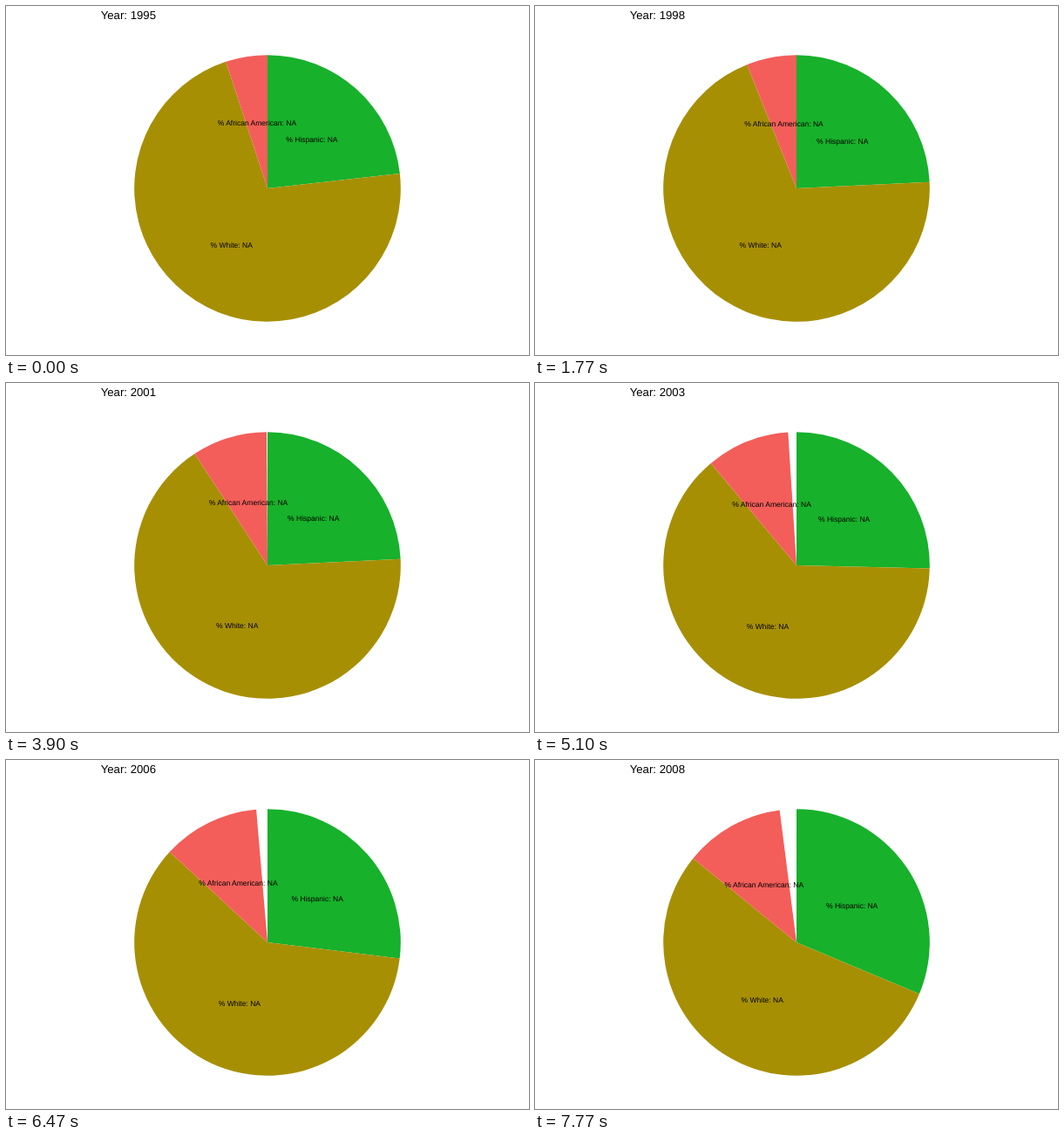
These frames come from a looping animation (600 by 400 pixels, 8000 ms). An HTML page:

```html
<!DOCTYPE html>
<html lang="en">
<head>
<meta charset="utf-8">
<title>Shares by year</title>
<style>
  html, body { margin: 0; width: 100%; height: 100%; overflow: hidden; background: #fff; }
  svg { display: block; width: 600px; height: 400px; }
  text {
    font: 8.54px "Liberation Sans", Arial, sans-serif;
    text-anchor: middle;
    text-rendering: geometricPrecision;
  }
  #year { font-size: 13.2px; text-anchor: start; }
</style>
</head>
<body>
<svg viewBox="0 0 600 400">
  <text id="year" x="108.7" y="15"></text>
  <g id="slices"></g>
  <g id="labels"></g>
</svg>
<script>
const LOOP = 8000, FPS = 30, HOLD = 9, MOVE = 9;
const FIRST_YEAR = 1995, FULL = 99;
const CX = 300, CY = 209, R = 152.8;

const groups = [
  { name: "Hispanic", color: "#17b12b" },
  { name: "White", color: "#a78f04" },
  { name: "African American", color: "#f35e5a" }
];

// Percentages per year, in the order of the groups
const shares = [
  [23, 71, 5], [24, 70, 5], [24, 69, 5], [24, 69, 6], [24, 68, 7],
  [23, 68, 8], [24, 66, 9], [24, 65, 9], [25, 63, 10], [26, 62, 10],
  [26, 60, 11], [27, 59, 12], [29, 56, 12], [31, 54, 12]
];

const add = (tag, parent) =>
  document.getElementById(parent).appendChild(
    document.createElementNS("http://www.w3.org/2000/svg", tag));

for (const g of groups) {
  g.slice = add("path", "slices");
  g.slice.setAttribute("fill", g.color);
  g.label = add("text", "labels");
  g.label.textContent = `% ${g.name}: NA`;
}
const yearText = document.getElementById("year");

function point(value, radius) {
  const a = value / FULL * 2 * Math.PI;
  return [CX + radius * Math.sin(a), CY - radius * Math.cos(a)];
}

function drawGroup(g, from, size) {
  const large = size > FULL / 2 ? 1 : 0;
  g.slice.setAttribute("d",
    `M${CX} ${CY}L${point(from, R)}A${R} ${R} 0 ${large} 1 ${point(from + size, R)}Z`);
  const [x, y] = point(from + size / 2, R / 2);
  g.label.setAttribute("x", x);
  g.label.setAttribute("y", y + 3.8);
}

let shown = -1;

function render(ms) {
  // Steps of 1/30 s, on a clock of 10 ms
  const t = Math.floor(ms % LOOP / 10) * 10;
  const step = Math.floor((t + 4) * FPS / 1000);
  if (step === shown) return;
  shown = step;

  const cycle = HOLD + MOVE;
  const i = Math.min(Math.floor(step / cycle), shares.length - 1);
  const moved = Math.max(0, step % cycle - HOLD + 1);
  const now = shares[i], next = shares[i + 1] || now;

  let from = 0;
  groups.forEach((g, n) => {
    const size = now[n] + (next[n] - now[n]) * moved / MOVE;
    drawGroup(g, from, size);
    from += size;
  });
  yearText.textContent = `Year: ${FIRST_YEAR + i + (moved > 5 ? 1 : 0)}`;
}

const start = performance.now();
function tick() {
  render(performance.now() - start);
  requestAnimationFrame(tick);
}
tick();
</script>
</body>
</html>
```
